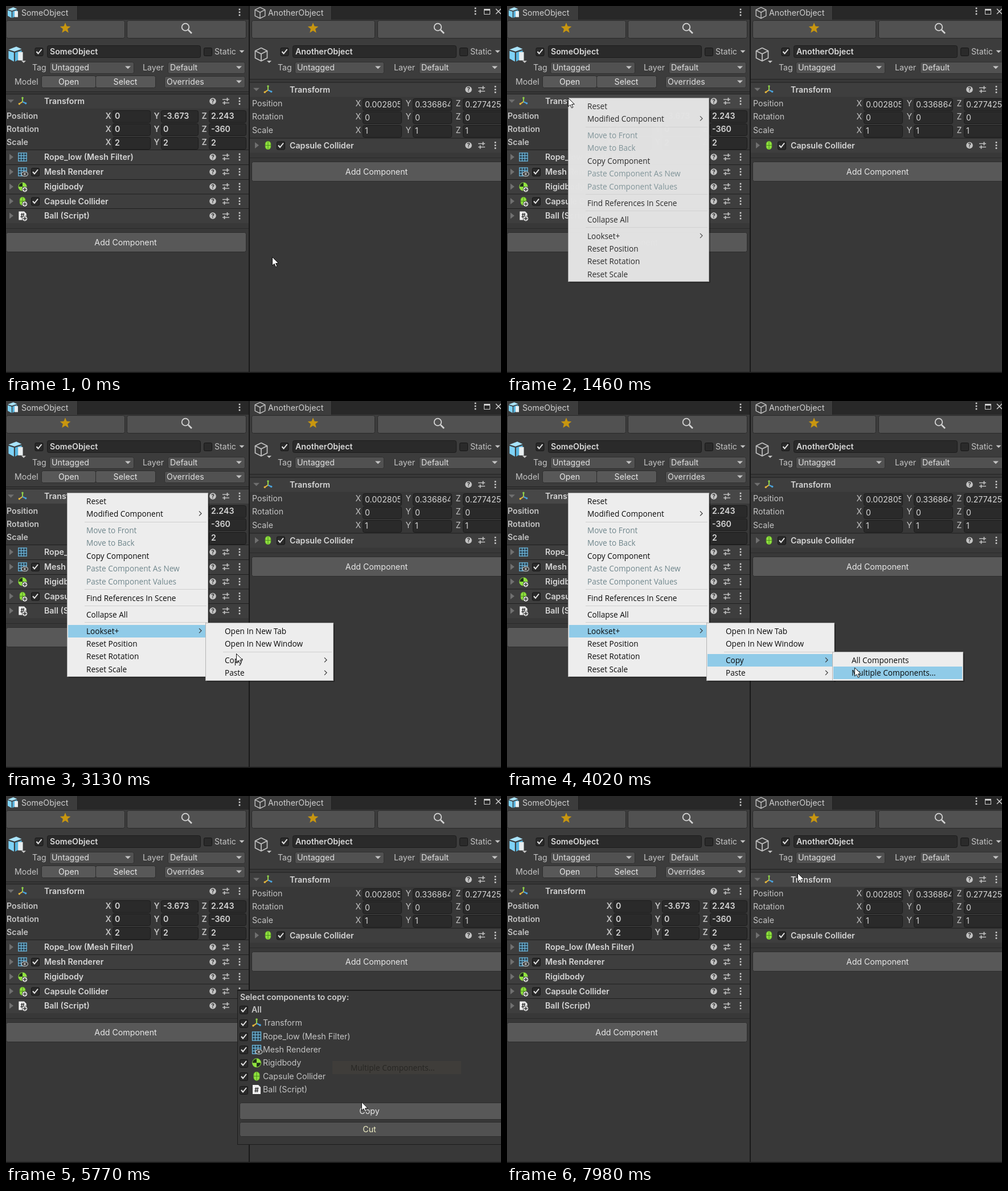
These frames come from a looping animation (869 by 644 pixels, 8000 ms). An HTML page with a canvas:

```html
<!DOCTYPE html>
<html lang="en">
<head>
<meta charset="utf-8">
<style>
  html, body { margin: 0; width: 100%; height: 100%; overflow: hidden; background: #383838; }
  canvas { display: block; }
</style>
</head>
<body>
<canvas id="stage" width="869" height="644"></canvas>
<script>
const c = document.getElementById('stage').getContext('2d');
const LOOP = 8000;
const REGULAR = '14.2px Inter, sans-serif';
const BOLD = '600 14.2px Inter, sans-serif';
const MENU = '13.6px "Open Sans", sans-serif';
const LABEL = '#c4c4c4', BRIGHT = '#e0e0e0', DARK = '#1f1f1f', BLUE = '#6fb9de', GREEN = '#8fe13f';

// ---------- primitives ----------
function rect(x0, y0, x1, y1, fill) {
  c.fillStyle = fill;
  c.fillRect(x0, y0, x1 - x0, y1 - y0);
}
function box(x0, y0, x1, y1, fill, border, radius = 3) {
  c.beginPath();
  c.roundRect(x0 + .5, y0 + .5, x1 - x0 - 1, y1 - y0 - 1, radius);
  c.fillStyle = fill;
  c.fill();
  c.lineWidth = 1;
  c.strokeStyle = border;
  c.stroke();
}
function poly(points, fill) {
  c.beginPath();
  points.forEach(([x, y]) => c.lineTo(x, y));
  c.closePath();
  c.fillStyle = fill;
  c.fill();
}
function line(points, color, width = 1) {
  c.beginPath();
  points.forEach(([x, y]) => c.lineTo(x, y));
  c.strokeStyle = color;
  c.lineWidth = width;
  c.stroke();
}
function disc(x, y, r, fill) {
  c.beginPath();
  c.arc(x, y, r, 0, 2 * Math.PI);
  c.fillStyle = fill;
  c.fill();
}
function text(label, x, y, color = LABEL, font = REGULAR, align = 'left') {
  c.font = font;
  c.textAlign = align;
  c.fillStyle = color;
  c.fillText(label, x, y + 5);
}
function at(x, y, scale, draw) {
  c.save();
  c.translate(x, y);
  c.scale(scale, scale);
  draw();
  c.restore();
}

// ---------- icons, drawn around (0, 0) ----------
function grid() {
  rect(-8, -8, 8, 8, '#2b4250');
  for (let i = 0; i < 4; i++) {
    const p = -7.5 + i * 5;
    line([[p, -8], [p, 8]], BLUE, 1.3);
    line([[-8, p], [8, p]], BLUE, 1.3);
  }
}
const icons = {
  transform() {
    line([[0, 1], [0, -6]], '#8fd14a', 2.2);
    line([[0, 1], [-6, 5]], '#e3b53c', 2.2);
    line([[0, 1], [6, 4]], '#4ba3dc', 2.2);
    disc(0, -6, 1.8, '#8fd14a');
    disc(-6, 5, 1.8, '#e3b53c');
    disc(6, 4, 1.8, '#4ba3dc');
  },
  grid,
  renderer() {
    grid();
    c.beginPath();
    c.ellipse(4, 4, 6, 4, 0, 0, 7);
    c.fillStyle = '#3a3a3a';
    c.fill();
    c.strokeStyle = '#b5b5b5';
    c.lineWidth = 1.4;
    c.stroke();
    disc(4, 4, 2, '#b5b5b5');
  },
  body() {
    disc(0, 0, 8, GREEN);
    for (const start of [0, Math.PI]) {
      c.beginPath();
      c.moveTo(0, 0);
      c.arc(0, 0, 7, start, start + Math.PI / 2);
      c.fillStyle = '#20301a';
      c.fill();
    }
  },
  capsule() {
    box(-5.5, -8, 5.5, 8, GREEN, '#6fbd2c', 5);
    line([[0, -7], [0, 7]], '#4c8a1c');
    line([[-5, 0], [5, 0]], '#4c8a1c');
  },
  script() {
    poly([[-7, -8], [3, -8], [7, -4], [7, 8], [-7, 8]], '#f0f0f0');
    text('#', 0, -.5, '#333', '700 12px Inter, sans-serif', 'center');
  },
  cube() {
    const hull = [[0, -11], [10, -6], [10, 6], [0, 11], [-10, 6], [-10, -6], [0, -11]];
    line(hull, LABEL, 1.6);
    line([[-10, -6], [0, -1], [10, -6]], LABEL, 1.6);
    line([[0, -1], [0, 11]], LABEL, 1.6);
  },
  blueCube() {
    poly([[-12, -8], [1, -13], [10, -9], [-2, -5]], '#a9e3fb');
    poly([[-12, -6], [-3, -3], [-3, 12], [-12, 7]], '#7fd3f7');
    poly([[-1, -3], [10, -7], [10, 6], [-1, 12]], '#58b5df');
    poly([[4, -4], [12, -4], [12, 10], [4, 10]], '#e8eef0');
  }
};
function badge(x, y) {
  disc(x, y, 5, '#303030');
  disc(x, y, 4.4, '#dcdcdc');
  line([[x - 3, y], [x + 3, y]], '#333', 1.4);
  line([[x, y - 3], [x, y + 3]], '#333', 1.4);
}
function downArrow(x, y, size = 5, color = LABEL) {
  poly([[x - size, y - size / 2], [x + size, y - size / 2], [x, y + size / 2]], color);
}
function star(x, y) {
  const points = [];
  for (let i = 0; i < 10; i++) {
    const r = i % 2 ? 4.3 : 9.8, a = i * Math.PI / 5 - Math.PI / 2;
    points.push([x + r * Math.cos(a), y + r * Math.sin(a)]);
  }
  poly(points, '#c8960f');
}
function magnifier(x, y) {
  c.beginPath();
  c.arc(x - 2, y - 2, 6.3, 0, 7);
  c.strokeStyle = '#d4d4d4';
  c.lineWidth = 1.8;
  c.stroke();
  line([[x + 3, y + 3], [x + 9, y + 9]], '#d4d4d4', 2.6);
}
function kebab(x, y) {
  for (const dy of [-5, 0, 5]) rect(x - 1.3, y + dy - 1.3, x + 1.3, y + dy + 1.3, '#d0d0d0');
}
function checkbox(x, y, checked = true, border = '#161616') {
  box(x - 7, y - 7, x + 8, y + 8, '#2a2a2a', border, 2);
  if (checked) line([[x - 4, y], [x - 1, y + 3.5], [x + 5, y - 4]], '#e6e6e6', 2);
}

// ---------- inspector panels ----------
function button(x0, y0, x1, y1, label, textX = (x0 + x1) / 2, fill = '#585858', color = '#e8e8e8') {
  box(x0, y0, x1, y1, fill, '#2c2c2c');
  text(label, textX, (y0 + y1) / 2, color, REGULAR, 'center');
}
function dropdown(x0, x1, y, label, arrowX) {
  box(x0, y - 10, x1, y + 11, '#515151', '#303030');
  text(label, x0 + 4, y, BRIGHT);
  downArrow(arrowX, y);
}
function header(panel, y, title, icon, { enabled, open, hot, badged } = {}) {
  const { x, tools } = panel;
  rect(panel.left, y - 13, panel.right, y + 13, hot ? '#474747' : '#3e3e3e');
  rect(panel.left, y - 13, panel.right, y - 12, DARK);
  if (open) downArrow(x + 8.5, y, 5.5, '#707070');
  else poly([[x + 6, y - 5.5], [x + 13, y], [x + 6, y + 5.5]], '#707070');
  at(x + 29, y, .95, icons[icon]);
  if (badged) badge(x + 33, y + 5);
  if (enabled) checkbox(x + 51, y);
  text(title, x + 67, y, '#d6d6d6', BOLD);
  disc(tools + 363, y, 5.8, LABEL);
  text('?', tools + 363, y - 1.5, '#333', '700 10px Inter, sans-serif', 'center');
  const s = tools + 386;
  line([[s - 6, y - 3], [s + 6, y - 3]], LABEL, 1.4);
  line([[s - 6, y + 3], [s + 6, y + 3]], LABEL, 1.4);
  line([[s + 2.5, y - 6], [s + 2.5, y]], LABEL, 1.8);
  line([[s - 2.5, y], [s - 2.5, y + 6]], LABEL, 1.8);
  kebab(tools + 410, y);
}
function vectorRows(panel, top, rows, font, valueDrop) {
  rows.forEach(([name, ...values], row) => {
    const y = top + row * 23.4;
    text(name, panel.x + 1, y, LABEL, font);
    values.forEach((value, i) => {
      const [x0, x1] = panel.fields[i];
      const middle = Math.round(y + 1 + valueDrop / 2);
      text('XYZ'[i], x0 - 12.5, y, LABEL, font);
      box(x0, middle - 11, x1, middle + 11, '#2a2a2a', '#1c1c1c');
      c.save();
      c.beginPath();
      c.rect(x0, middle - 11, x1 - x0 - 3, 22);
      c.clip();
      text(value, x0 + 4, y + valueDrop, '#d6d6d6', font);
      c.restore();
    });
  });
}
function panelTop(panel, name, icon, tabEnd, bottom) {
  const { x, tools, left, right, layer } = panel;
  rect(left, 0, right, 24, '#282828');
  rect(left, 0, tabEnd, 24, '#3c3c3c');
  rect(tabEnd - 1, 0, tabEnd, 24, DARK);
  rect(left, 24, right, bottom, '#3c3c3c');
  rect(left, bottom, right, bottom + 1, '#222');
  at(x + (x ? 15 : 12), 12, icon === 'cube' ? .88 : .75, icons[icon]);
  text(name, x + (x ? 29 : 27), 12, '#cfcfcf');
  panel.bar.forEach(([x0, x1]) => box(x0, 25, x1, 57, '#515151', '#2a2a2a'));
  star(x ? 539 : 104, 39);
  magnifier(x ? 760 : 317, 39);
  at(x + 17, 85, 1.05, icons[icon]);
  downArrow(x + 31, 98, 4);
  checkbox(x + 57.5, 80);
  box(x + 72, 69, tools + 342, 91, '#2a2a2a', '#1c1c1c');
  text(name, x + 77, 80, '#d8d8d8', BOLD);
  checkbox(tools + 354, 80, false);
  text('Static', tools + 366, 80);
  downArrow(tools + 414, 80, 4.5);
  text('Tag', x + 46, 108);
  dropdown(x + 76, panel.tagEnd, 108, 'Untagged', panel.tagEnd - 11);
  text('Layer', layer + 240, 108);
  dropdown(layer + 284, x ? 872 : 420, 108, 'Default', tools + 409);
}

const leftPanel = {
  x: 0, tools: 0, layer: 0, left: 0, right: 426, tagEnd: 225,
  bar: [[0, 209], [212, 422]], fields: [[187, 254], [272, 338], [356, 422]]
};
const rightPanel = {
  x: 431, tools: 449, layer: 441, left: 428, right: 869, tagEnd: 664,
  bar: [[431, 648], [652, 872]], fields: [[626, 695], [714, 783], [802, 875]]
};

function drawPanels(leftHot, rightHot) {
  rect(0, 0, 869, 644, '#383838');

  panelTop(leftPanel, 'SomeObject', 'blueCube', 126, 150);
  kebab(410, 11);
  text('Model', 15, 133);
  button(62, 122, 158, 144, 'Open', 110);
  button(157, 122, 263, 144, 'Select', 209.5);
  dropdown(278, 420, 133, 'Overrides', 409);
  header(leftPanel, 167, 'Transform', 'transform', { open: true, hot: leftHot });
  vectorRows(leftPanel, 192.5, [
    ['Position', '0', '-3.673', '2.243'],
    ['Rotation', '0', '0', '-360'],
    ['Scale', '2', '2', '2']
  ], BOLD, 0.5);
  header(leftPanel, 265, 'Rope_low (Mesh Filter)', 'grid');
  header(leftPanel, 291, 'Mesh Renderer', 'renderer', { enabled: true });
  header(leftPanel, 317, 'Rigidbody', 'body', { badged: true });
  header(leftPanel, 342.5, 'Capsule Collider', 'capsule', { enabled: true, badged: true });
  header(leftPanel, 368, 'Ball (Script)', 'script', { badged: true });
  rect(0, 390, 426, 391, '#2a2a2a');
  button(0, 397, 422, 432, 'Add Component', 210);

  panelTop(rightPanel, 'AnotherObject', 'cube', 572, 128);
  kebab(824, 9);
  c.strokeStyle = '#d0d0d0';
  c.lineWidth = 1;
  c.strokeRect(839.5, 5.5, 10, 9);
  rect(839, 5, 850, 8, '#d0d0d0');
  line([[860, 5], [869, 14]], '#d0d0d0', 1.5);
  line([[869, 5], [860, 14]], '#d0d0d0', 1.5);
  header(rightPanel, 146.5, 'Transform', 'transform', { open: true, hot: rightHot });
  vectorRows(rightPanel, 171, [
    ['Position', '0.002805', '0.336864', '0.277425'],
    ['Rotation', '0', '0', '0'],
    ['Scale', '1', '1', '1']
  ], REGULAR, 1.5);
  header(rightPanel, 244.5, 'Capsule Collider', 'capsule', { enabled: true });
  rect(428, 266, 869, 267, '#2a2a2a');
  button(431, 273, 875, 308, 'Add Component', 650.5);

  rect(426, 0, 428, 644, '#191919');
  rect(0, 642, 869, 644, '#1c1c1c');
}

// ---------- context menus ----------
const SEPARATOR = null;
const menus = [
  { x0: 107, y0: 161, x1: 355, y1: 484, opens: 1240, fade: 260, parent: 'Lookset+', items: [
    ['Reset'], ['Modified Component', 'sub'], SEPARATOR,
    ['Move to Front', 'off'], ['Move to Back', 'off'], ['Copy Component'],
    ['Paste Component As New', 'off'], ['Paste Component Values', 'off'], SEPARATOR,
    ['Find References In Scene'], SEPARATOR, ['Collapse All'], SEPARATOR,
    ['Lookset+', 'sub'], ['Reset Position'], ['Reset Rotation'], ['Reset Scale']] },
  { x0: 350, y0: 389, x1: 575, y1: 491, opens: 2640, fade: 180, parent: 'Copy', items: [
    ['Open In New Tab'], ['Open In New Window'], SEPARATOR, ['Copy', 'sub'], ['Paste', 'sub']] },
  { x0: 571, y0: 440, x1: 801, y1: 491, opens: 3290, fade: 170, items: [
    ['All Components'], ['Multiple Components...']] }
];
const MENUS_CLOSE = 4440;

function drawMenu(menu, child, t, cursor) {
  const { x0, y0, x1, y1 } = menu;
  const inChild = child && t > child.opens && cursor.x >= child.x0;
  c.save();
  c.globalAlpha = ramp(t, menu.opens, menu.fade);
  rect(x0 + 3, y0 + 3, x1 + 2, y1 + 2, 'rgba(0,0,0,.3)');
  rect(x0, y0, x1, y1, '#b4b4b4');
  rect(x0 + 1, y0 + 1, x1 - 1, y1 - 1, '#ededed');
  let y = y0 + 14.5;
  for (const item of menu.items) {
    if (item === SEPARATOR) {
      rect(x0 + 31, Math.round(y - 8.8), x1 - 3, Math.round(y - 8.8) + 1, '#cfcfcf');
      y += 6.5;
      continue;
    }
    const [label, kind] = item;
    const hovered = cursor.x > x0 && Math.abs(cursor.y - y) < 11;
    if (inChild ? label === menu.parent : hovered) {
      rect(x0 + 2, Math.round(y - 11), x1 - 2, Math.round(y + 11), '#90cbe8');
    }
    text(label, x0 + 34, y, kind === 'off' ? '#6f868c' : '#0a0a0a', MENU);
    if (kind === 'sub') line([[x1 - 16, y - 4.5], [x1 - 12, y - .5], [x1 - 16, y + 3.5]], '#333', 1.2);
    y += 22.45;
  }
  c.restore();
}

// ---------- copy dialog ----------
const components = [
  ['All'], ['Transform', 'transform'], ['Rope_low (Mesh Filter)', 'grid'], ['Mesh Renderer', 'renderer'],
  ['Rigidbody', 'body'], ['Capsule Collider', 'capsule'], ['Ball (Script)', 'script']
];
function drawDialog(t, cursor) {
  c.save();
  c.globalAlpha = ramp(t, 4430, 170) * (1 - ramp(t, 6490, 110));
  rect(406, 340, 869, 612, '#1c1c1c');
  rect(407, 342, 869, 611, '#383838');
  text('Select components to copy:', 411, 353, '#cfcfcf', BOLD);
  components.forEach(([label, icon], i) => {
    const y = 374.7 + i * 23.4;
    const hot = Math.abs(cursor.y - y) < 11.7;
    checkbox(417, Math.round(y + .5), true, hot ? '#757575' : '#161616');
    if (icon) at(440, y, 1, icons[icon]);
    text(label, icon ? 451 : 431, y, LABEL, icon ? REGULAR : BOLD);
  });
  button(410, 538, 873, 568, 'Copy', 638);
  button(410, 572, 873, 598, 'Cut', 638, '#515151', '#efefc4');

  // the chosen menu item lingers as a faint imprint
  rect(573, 465, 799, 488, 'rgba(76,70,60,.35)');
  text('Multiple Components...', 605, 477, 'rgba(24,24,20,.6)', MENU);
  c.globalAlpha = 1 - ramp(t, MENUS_CLOSE, 230);
  rect(573, 466, 799, 488, '#90cbe8');
  text('Multiple Components...', 605, 477, '#0a0a0a', MENU);
  c.restore();
}

// ---------- pointer ----------
const path = [
  [0, 467, 440], [40, 467, 440], [770, 107, 161], [1740, 107, 161], [2130, 221, 382],
  [2270, 222, 397], [2450, 222, 397], [2650, 208, 398], [2950, 355, 410], [3130, 404, 443],
  [3220, 404, 447], [3590, 404, 447], [4160, 646, 471], [4270, 646, 471], [4300, 659, 474],
  [4420, 659, 474], [4450, 658, 477], [5240, 658, 477], [6050, 611, 559], [6140, 613, 567],
  [6270, 613, 567], [6290, 615, 568], [7120, 615, 568], [7940, 510, 135], [LOOP, 510, 135]
];
function ramp(t, start, duration) {
  return Math.min(1, Math.max(0, (t - start) / duration));
}
function pointerAt(t) {
  const next = path.findIndex(([time]) => time > t);
  const [t0, x0, y0] = path[next - 1], [t1, x1, y1] = path[next];
  const k = (t - t0) / (t1 - t0), s = k * k * (3 - 2 * k);
  return { x: x0 + (x1 - x0) * s, y: y0 + (y1 - y0) * s };
}
function drawPointer({ x, y }) {
  const arrow = [[0, 0], [0, 15], [3.5, 11.8], [6, 17.3], [8.4, 16.3], [6, 11], [10.8, 10.8], [0, 0]]
    .map(([dx, dy]) => [x + .5 + dx, y + .5 + dy]);
  poly(arrow, '#fff');
  line(arrow, '#111', 1);
}

function draw() {
  const t = performance.now() % LOOP;
  const cursor = pointerAt(t);
  const menuOpen = t >= menus[0].opens && t < MENUS_CLOSE;
  const leftHot = menuOpen || cursor.x < 426 && cursor.y < 180;
  const rightHot = cursor.x > 428 && cursor.y < 159;
  drawPanels(leftHot, rightHot);
  if (menuOpen) {
    menus.forEach((menu, i) => { if (t >= menu.opens) drawMenu(menu, menus[i + 1], t, cursor); });
  }
  if (t >= MENUS_CLOSE && t < 6600) drawDialog(t, cursor);
  drawPointer(cursor);
  requestAnimationFrame(draw);
}
draw();
</script>
</body>
</html>
```
